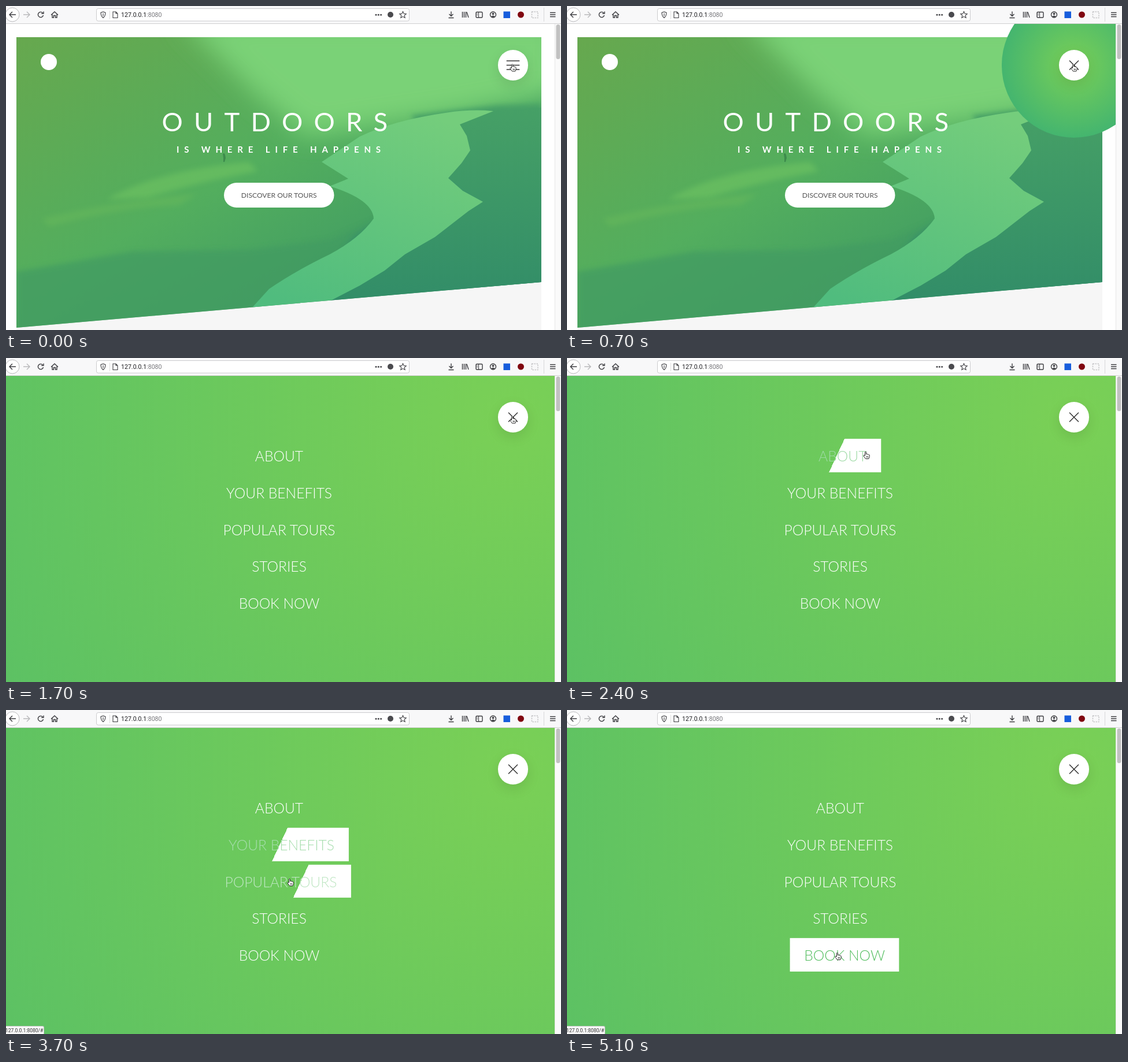
These frames come from a looping animation (960x561 px, 5200 ms). An HTML page:

```html
<!DOCTYPE html>
<html lang="en">
<head>
<meta charset="utf-8">
<title>Outdoors</title>
<style>
  html, body { margin: 0; width: 960px; height: 561px; overflow: hidden; background: #fff; }
  body { position: relative; font-family: Lato, sans-serif; }
  svg { position: absolute; left: 0; top: 0; }
  #view { position: absolute; left: 0; top: 31px; width: 949px; height: 530px; overflow: hidden; }
  #disc { position: absolute; border-radius: 50%; background: radial-gradient(#7ad056, #2eaa79); }
  #nav { position: absolute; left: -4px; top: 265.4px; }
  #nav ul { position: absolute; left: 0; top: 0; width: 100%; margin: 0; padding: 0;
    transform: translateY(-50%); list-style: none; text-align: center; }
  #nav li + li { margin-top: 6.2px; }
  #nav a { display: inline-block; vertical-align: top; box-sizing: border-box;
    padding: 9px 24.5px 7.3px; font-size: 24.6px; font-weight: 300; line-height: 41.2px;
    background: linear-gradient(115deg, transparent 50%, #fff 50%) 0 0 / 220%; }
  #button { position: absolute; left: 850.7px; top: 45.2px; width: 52.6px; height: 52.6px;
    border-radius: 50%; background: #fff; box-shadow: 0 7.5px 22px rgba(0, 0, 0, .1); }
  #status { position: absolute; left: -1px; bottom: 0; width: 67px; height: 14px; box-sizing: border-box;
    border: solid #c8c8c8; border-width: 1px 1px 0 0; border-radius: 0 3px 0 0; background: #f8f8f8;
    font: 8.5px/14px Roboto, sans-serif; color: #333; white-space: nowrap; }
</style>
</head>
<body>
<svg width="960" height="561">
  <defs>
    <linearGradient id="land" x2="1" y2="1">
      <stop stop-color="#67a84e"/><stop offset=".45" stop-color="#53ae5e"/><stop offset="1" stop-color="#328e67"/>
    </linearGradient>
    <linearGradient id="river" x1=".7" x2=".2" y2="1">
      <stop stop-color="#74cd7c"/><stop offset="1" stop-color="#50bc7e"/>
    </linearGradient>
    <linearGradient id="bank" x2="0" y2="1">
      <stop stop-color="#46a066"/><stop offset="1" stop-color="#328d68"/>
    </linearGradient>
    <filter id="soft" x="-30%" y="-30%" width="160%" height="160%"><feGaussianBlur stdDeviation="22"/></filter>
    <filter id="haze" x="-30%" y="-30%" width="160%" height="160%"><feGaussianBlur stdDeviation="5"/></filter>
    <clipPath id="hero"><path d="M18 54H926V478L18 557Z"/></clipPath>
  </defs>

  <path d="M18 557L926 478V561H18Z" fill="#f6f6f6"/>
  <g clip-path="url(#hero)">
    <path d="M0 54H926V561H0Z" fill="url(#land)"/>
    <path d="M300 20H960V150L790 185 650 205 520 225 430 150Z" fill="#7ad277" filter="url(#soft)"/>
    <path d="M18 460L220 425 420 422 560 405 640 370 600 450 420 530 18 570Z" fill="#429b62" opacity=".75" filter="url(#haze)"/>
    <path d="M175 335Q260 285 420 270L435 286Q330 305 245 332Z" fill="#70c462" opacity=".6" filter="url(#haze)"/>
    <path d="M62 368Q200 335 330 325L300 345Q190 350 75 382Z" fill="#6abb5c" opacity=".45" filter="url(#haze)"/>
    <path d="M700 190L850 172 926 170V490H540L600 400 780 280Z" fill="url(#bank)" filter="url(#haze)"/>
    <path d="M843 182L926 176V480L558 512 690 430 825 339 765 298 803 250 785 205Z" fill="url(#bank)"/>
    <path d="M843 182Q805 178 760 185 670 198 612 226L546 270 592 299 560 312Q634 335 636 368 612 402 560 430 498 460 455 490L425 523 558 512 612 484 655 458 690 430 742 400 800 355 825 339 790 320 765 298 788 272 803 250 797 225 785 205Z" fill="url(#river)"/>
    <path d="M375 256q3-3 4 2l1 5-2 7h-2v-7z" fill="#3d8b4c"/>
  </g>
  <circle cx="74" cy="97" r="14" fill="#fff"/>
  <g fill="#fff">
    <text x="269.5" y="217" font-size="45.3" letter-spacing="19.2">OUTDOORS</text>
    <text x="295" y="254" font-size="15.1" font-weight="700" letter-spacing="8.8">IS WHERE LIFE HAPPENS</text>
    <rect x="377" y="306" width="190.5" height="43" rx="21.5"/>
  </g>
  <text x="472.2" y="332" font-size="12.1" text-anchor="middle" fill="#555">DISCOVER OUR TOURS</text>

  <path d="M949 31H960V561H949Z" fill="#fafafa"/>
  <path d="M949.5 31V561" stroke="#e6e6e6"/>
  <rect x="951.5" y="32" width="7" height="60" rx="3.5" fill="#c1c1c1"/>

  <path d="M0 0H960V30H0Z" fill="#f8f8f9"/>
  <path d="M0 30.5H960" stroke="#cfcfd0"/>
  <rect x="156.5" y="4.5" width="541" height="21.5" rx="3" fill="#fff" stroke="#cbcbcd"/>
  <circle cx="11" cy="15" r="12" fill="#fff" stroke="#b9b9bb"/>
  <g fill="none" stroke="#3c3c40" stroke-width="1.4">
    <path d="M17 15H6M11 10L6 15 11 20"/>
    <path d="M30 15H41M36 10L41 15 36 20" stroke="#b8b8ba"/>
    <path d="M63.5 12A4.6 4.6 0 1 0 64.5 16M65 9.5V13H61.2"/>
    <path d="M78 15.5L84 10 90 15.5M80 14.5V20H82.5V16.5H85.500V20H88V14.500"/>
    <path d="M168 10L172 11.500Q172 17.500 168 20.500 164 17.500 164 11.500ZM168 12.500V17.500" stroke-width="1.1"/>
    <path d="M179.500 8V23" stroke="#ddd" stroke-width="1"/>
    <path d="M185 10H190L193 13V20.500H185ZM190 10V13H193" stroke-width="1.1"/>
    <path d="M686.500 9.500L688.200 13.300 692.200 13.700 689.200 16.400 690.100 20.400 686.500 18.300 682.900 20.400 683.800 16.400 680.800 13.700 684.800 13.300Z" stroke-width="1.1"/>
    <path d="M770 9.500V17M766.500 14L770 17.500 773.500 14M765.500 20.500H774.500"/>
    <path d="M789.500 10V20M792.500 10V20M795.500 10V20M797 10.500L800 20"/>
    <rect x="813" y="10.500" width="11" height="9.500" rx="1.500"/>
    <path d="M817.500 10.500V20M814.500 13H816M814.500 15.500H816" stroke-width="1"/>
    <circle cx="842.500" cy="15" r="5"/>
    <path d="M909.500 10H920V20.500H909.500Z" stroke="#c4c4c6" stroke-dasharray="2.500 1.500"/>
    <path d="M930.500 3V27" stroke="#d8d8da" stroke-width="1"/>
    <path d="M941 11.500H950.500M941 15H950.500M941 18.500H950.500"/>
  </g>
  <g fill="#4a4a4e">
    <circle cx="640" cy="15.200" r="1.500"/><circle cx="644.300" cy="15.200" r="1.500"/><circle cx="648.600" cy="15.200" r="1.500"/>
    <circle cx="665" cy="15" r="5"/>
    <circle cx="842.500" cy="13.500" r="1.900"/><path d="M839 18.500Q842.500 14.500 846 18.500L842.500 20Z"/>
  </g>
  <rect x="860.500" y="9.500" width="11.500" height="11.500" fill="#175ddc"/>
  <circle cx="890.500" cy="15" r="5.500" fill="#800610"/>
  <text x="199" y="19.300" font-family="Roboto, sans-serif" font-size="10.600" fill="#1b1b1e">127.0.0.1<tspan fill="#77777b">:8080</tspan></text>
</svg>

<div id="view">
  <div id="disc"></div>
  <div id="nav"><ul>
    <li><a>ABOUT</a></li>
    <li><a>YOUR BENEFITS</a></li>
    <li><a>POPULAR TOURS</a></li>
    <li><a>STORIES</a></li>
    <li><a>BOOK NOW</a></li>
  </ul></div>
  <div id="button"></div>
  <div id="status">127.0.0.1:8080/#</div>
</div>

<svg width="960" height="561">
  <g stroke="#333" stroke-width="1.500">
    <path id="top" d="M-11.300 0H11.300"/>
    <path id="middle" d="M865.700 102.500H888.300"/>
    <path id="bottom" d="M-11.300 0H11.300"/>
  </g>
  <g id="cursor" fill="#fff" stroke="#222" stroke-linejoin="round">
    <path id="hand" d="M-2.500 1V-5Q-1.500 -7 -.500 -5V-1.500Q1 -2.700 1.800 -1.200 3.200 -2 3.800 -.500 5.300 -.800 5.300 1.200 5.300 4 3.800 6.500H-1.500Q-3.500 4 -5.300 1 -4.800 -.800 -2.500 1ZM.300 2V4.500M2.300 2V4.500"/>
    <path id="arrow" d="M-4 -6V5L-1.400 2.600 .300 6.500 2 5.800 .300 2H4Z" fill="#111" stroke="#fff"/>
  </g>
</svg>

<script>
const $ = id => document.getElementById(id);
const links = [...document.querySelectorAll('#nav a')];
const LOOP = 5200, STEP = 100;
const DISC_START = 475, NAV_START = 580, LEAVE_BUTTON = 1830;
const CENTER = { x: 877, y: 102.5 };

// Enter and leave time of the pointer for each menu entry
const hovers = [[2270, 2930], [2945, 3585], [3605, 4185], [4200, 4630], [4645, 9999]];
// Pointer path: time, x, y
const path = [
  [0, 877, 106.500], [1780, 877, 106.500], [2270, 536, 172], [2400, 518, 168], [2800, 511, 173],
  [3000, 503, 228], [3480, 499, 237], [3700, 492, 298], [4050, 489, 301], [4350, 480, 360],
  [4500, 477, 364], [4800, 471, 423], [5100, 469, 426], [LOOP, 469, 426]
];

const clamp = x => Math.min(1, Math.max(0, x));
const mix = (a, b, k) => a + (b - a) * k;

function bezier(x1, y1, x2, y2) {
  const at = (a, b, s) => 3 * s * (1 - s) ** 2 * a + 3 * s * s * (1 - s) * b + s ** 3;
  return x => {
    if (x <= 0 || x >= 1) return clamp(x);
    let lo = 0, hi = 1;
    for (let i = 0; i < 30; i++) {
      const mid = (lo + hi) / 2;
      if (at(x1, x2, mid) < x) lo = mid; else hi = mid;
    }
    return at(y1, y2, lo);
  };
}
const ease = bezier(.25, .1, .25, 1);
const expand = bezier(.86, 0, .07, 1);
const elastic = bezier(.68, -.55, .265, 1.55);

function pointer(t) {
  const i = path.findIndex(p => p[0] > t);
  const [t0, x0, y0] = path[i - 1], [t1, x1, y1] = path[i];
  const k = (t - t0) / (t1 - t0);
  return [mix(x0, x1, k), mix(y0, y1, k)];
}

function draw(t) {
  const r = 22.6 * (1 + 79 * expand((t - DISC_START) / 800));
  Object.assign($('disc').style, {
    left: CENTER.x - r + 'px', top: CENTER.y - 31 - r + 'px', width: 2 * r + 'px', height: 2 * r + 'px'
  });

  const open = elastic((t - NAV_START) / 800);
  $('nav').style.width = Math.max(0, open * 953) + 'px';
  $('nav').style.opacity = clamp(open);

  links.forEach((link, i) => {
    const [enter, leave] = hovers[i];
    const p = ease((t - enter) / 400) * (1 - ease((t - leave) / 400));
    link.style.backgroundPosition = p * 100 + '% 0';
    link.style.transform = `translateX(${p * 7.6}px)`;
    link.style.color = `rgb(${mix(255, 84, p)}, ${mix(255, 190, p)}, ${mix(255, 96, p)})`;
  });

  const turn = ease((t - DISC_START) / 200);
  const bar = (id, side) => $(id).setAttribute('transform',
    `translate(${CENTER.x} ${CENTER.y + side * 7.5 * (1 - turn)}) rotate(${-side * 135 * turn})`);
  bar('top', -1);
  bar('bottom', 1);
  $('middle').style.opacity = t < DISC_START ? 1 : 0;

  const onLink = t < LEAVE_BUTTON || t >= hovers[0][0];
  $('hand').style.display = onLink ? '' : 'none';
  $('arrow').style.display = onLink ? 'none' : '';
  $('cursor').setAttribute('transform', `translate(${pointer(t)})`);
  $('status').style.display = t >= 2500 ? '' : 'none';
}

const start = performance.now();
function tick() {
  const t = (performance.now() - start) % LOOP;
  draw(Math.floor(t / STEP) * STEP);
  requestAnimationFrame(tick);
}
tick();
</script>
</body>
</html>
```
